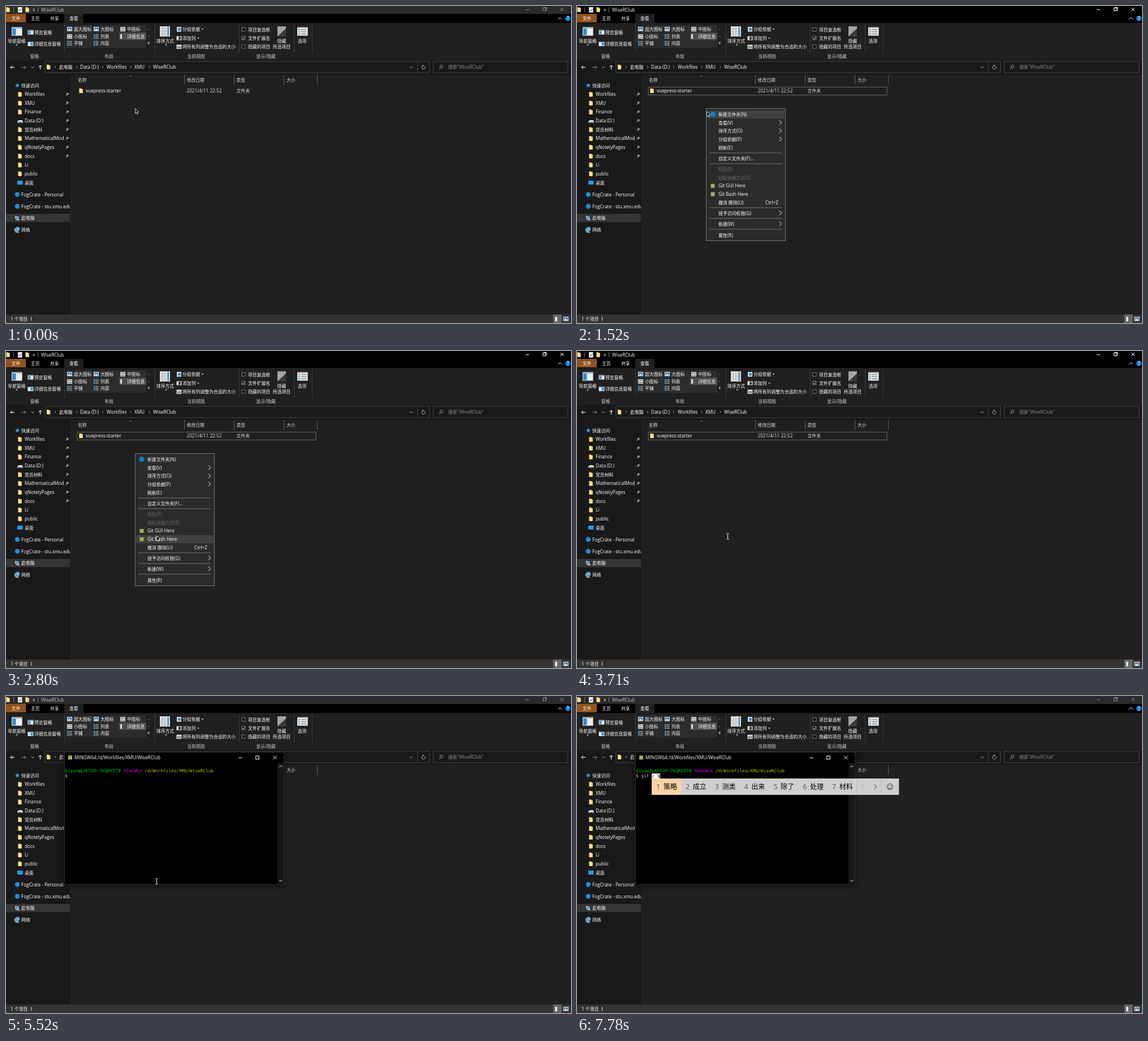
An HTML page with a canvas that plays this animation: 999 px wide and 561 px high, repeating every 8000 ms.

```html
<!DOCTYPE html>
<html lang="zh-CN">
<head>
<meta charset="utf-8">
<style>
html, body { margin: 0; width: 100%; height: 100%; overflow: hidden; background: #202020; }
canvas { display: block; width: 999px; height: 561px; }
</style>
</head>
<body>
<canvas id="stage" width="999" height="561"></canvas>
<script>
const g = document.getElementById('stage').getContext('2d');
const LOOP = 8000;
const UI = '"Open Sans", "Noto Sans CJK SC", "Noto Sans CJK", sans-serif';
const MONO = '"DejaVu Sans Mono", monospace';
const CELL = 4.7, COL0 = 104;
const BLUE = '#1e9be8', GIT = '#9ab45c';

function box(x, y, w, h, c) { g.fillStyle = c; g.fillRect(x, y, w, h); }
function frame(x, y, w, h, c, lw = 1) {
  g.strokeStyle = c; g.lineWidth = lw;
  g.strokeRect(x + .5, y + .5, w - 1, h - 1);
}
function line(c, lw, ...p) {
  g.strokeStyle = c; g.lineWidth = lw;
  g.beginPath();
  for (let i = 0; i < p.length; i += 2) g.lineTo(p[i], p[i + 1]);
  g.stroke();
}
function poly(c, ...p) {
  g.fillStyle = c;
  g.beginPath();
  for (let i = 0; i < p.length; i += 2) g.lineTo(p[i], p[i + 1]);
  g.closePath(); g.fill();
}
function disc(x, y, r, c) { g.fillStyle = c; g.beginPath(); g.arc(x, y, r, 0, 7); g.fill(); }
// y is the visual middle of the line; Chinese runs are set slightly smaller than Latin ones
function text(s, x, y, c = '#fff', align = 'left') {
  const runs = s.match(/[\u4e00-\u9fff]+|[^\u4e00-\u9fff]+/g);
  const setFont = r => g.font = (r >= '\u4e00' ? 7.85 : 8.2) + 'px ' + UI;
  const widths = runs.map(r => { setFont(r); return g.measureText(r).width; });
  if (align == 'center') x -= widths.reduce((a, b) => a + b) / 2;
  g.textAlign = 'left';
  g.fillStyle = c;
  runs.forEach((r, i) => {
    setFont(r);
    g.fillText(r, x, y + 3);
    x += widths[i];
  });
}
function chevron(x, y, dx, dy, c = '#fff', lw = 1) {
  if (dx) line(c, lw, x - dx / 2, y - Math.abs(dx), x + dx / 2, y, x - dx / 2, y + Math.abs(dx));
  else line(c, lw, x - Math.abs(dy), y - dy / 2, x, y + dy / 2, x + Math.abs(dy), y - dy / 2);
}
function drop(x, y, c = '#ddd') { poly(c, x - 1.8, y - 1, x + 1.8, y - 1, x, y + 1.2); }
function folder(x, y) {
  poly('#e3b341', x + .6, y - 4.2, x + 4.5, y - 4.2, x + 5.2, y - 3, x + 7, y - 3, x + 7, y + 4, x + .6, y + 4);
  poly('#fbe08a', x + .6, y - 4.2, x + 3.8, y - 3.3, x + 5.8, y - 2, x + 5.8, y + 4.3, x + .6, y + 4);
}
function pane(x, y, left) {
  box(x, y, 10, 8, '#e8e8e8');
  box(x, y, 10, 1.5, '#888');
  box(left ? x + 1 : x + 5, y + 2, 4, 5, BLUE);
}
function listIcon(x, y, c = '#ddd') {
  for (let i = 0; i < 3; i++) {
    box(x, y - 4 + i * 3, 2.5, 2, '#58a6e0');
    box(x + 3.5, y - 3.5 + i * 3, 5, 1, c);
  }
}
function gridIcon(x, y) {
  box(x, y - 4, 9, 8, '#ddd');
  for (let i = 0; i < 6; i++) box(x + 1 + i % 3 * 2.7, y - 2.7 + (i > 2) * 3.6, 1.6, 1.8, '#555');
}
function picIcon(x, y) {
  box(x, y - 4, 9, 7.5, '#eee');
  box(x + 1, y - 3, 7, 5.5, '#3d7eb0');
  poly('#dfeaf0', x + 1, y + 2.5, x + 4, y - 1, x + 8, y + 2.5);
}
function windowButtons(xs, y, c, r) {
  line(c, 1, xs[0] - r, y + .5, xs[0] + r, y + .5);
  frame(xs[1] - r, y - r, 2 * r, 2 * r, c);
  line(c, 1, xs[2] - r, y - r, xs[2] + r, y + r);
  line(c, 1, xs[2] - r, y + r, xs[2] + r, y - r);
}

function titleBar(active) {
  box(0, 0, 999, 14, active ? '#000' : '#2b2b2b');
  folder(0, 6.5);
  box(13, 2, 1, 9, '#777');
  box(21, 2, 7.5, 9.5, '#f2f2f2');
  line('#444', 1, 22.5, 7, 24, 9, 27, 5);
  folder(34, 6.5);
  box(47.5, 5, 3.5, .8, '#ccc');
  drop(49.2, 8);
  box(56, 2, 1, 9, '#777');
  text('WiseRClub', 62, 6.5, active ? '#fff' : '#c4c4c4');
  const c = active ? '#fff' : '#8c8c8c';
  windowButtons([922, 952, 983], 6, c, 3);
  line(c, .8, 950.5, 2.5, 955.8, 2.5, 955.8, 7.5);
}

function tabs() {
  box(0, 14, 999, 16, '#000');
  box(0, 14, 35, 15, '#93531b');
  box(103, 14, 34, 16, '#202020');
  text('文件', 17.5, 22, '#fff', 'center');
  text('主页', 44, 22);
  text('共享', 78, 22);
  text('查看', 112, 22);
  chevron(979.5, 22, 0, -3.5);
  disc(993.5, 22, 4.7, '#0a84d8');
  text('?', 993.5, 22, '#fff', 'center');
}

function ribbon() {
  box(0, 30, 999, 66, '#202020');
  for (const x of [103, 263, 412, 509, 541]) box(x, 32, 1, 51, '#3c3c3c');

  box(10, 37, 18.5, 15.5, '#eee');
  box(10, 37, 18.5, 2.5, '#9aa4aa');
  box(11, 40, 6.5, 11.5, '#2b8fd0');
  text('导航窗格', 19, 62, '#fff', 'center');
  drop(19, 69);
  pane(38.5, 42.5, true);
  text('预览窗格', 50, 47);
  pane(38.5, 63);
  text('详细信息窗格', 50, 67);

  box(106, 34, 142, 40, '#2c2c2c');
  box(200, 47, 48, 13, '#4e4e4e');
  picIcon(108, 41); text('超大图标', 120, 41);
  gridIcon(108, 54); text('小图标', 120, 54);
  listIcon(108, 66); text('平铺', 120, 66);
  picIcon(155, 41); text('大图标', 167, 41);
  listIcon(155, 54); text('列表', 167, 54);
  listIcon(155, 66); text('内容', 167, 66);
  gridIcon(202, 41); text('中图标', 214, 41);
  box(202, 50, 3, 8, '#ddd'); text('详细信息', 214, 54);
  poly('#666', 250.5, 42, 254, 42, 252.2, 40);
  drop(252.2, 54, '#666');
  box(250.4, 63.6, 3.6, .8, '#ddd');
  drop(252.2, 66.5);

  box(272, 36, 18, 18, '#eee');
  for (let i = 0; i < 5; i++) box(272, 39 + i * 3, 18, .7, '#8d99a0');
  for (let i = 0; i < 3; i++) box(276 + i * 4.5, 36, .7, 18, '#8d99a0');
  box(286, 37, 2, 16, '#3a96d2');
  text('排序方式', 281.5, 62, '#fff', 'center');
  drop(283, 69);
  box(302, 37, 8, 8.5, '#ddd'); box(304, 39, 5, 4.5, '#2b8fd0');
  text('分组依据', 312, 41); drop(347.5, 41);
  box(301.5, 53.5, 9, 7, '#ddd'); box(305, 54.5, 1, 6, '#444'); box(306, 54.5, 3, 5, '#333');
  text('添加列', 312, 57); drop(340, 57);
  box(301.5, 68.5, 9, 7.5, '#ddd');
  for (let i = 0; i < 3; i++) box(303 + i * 2.5, 71, 1.3, 4, '#456');
  text('将所有列调整为合适的大小', 312, 72);

  ['项目复选框', '文件扩展名', '隐藏的项目'].forEach((s, i) => {
    const y = 41.5 + i * 15.2;
    box(417, y - 3.5, 7, 7, '#000');
    frame(416.5, y - 3.5, 7, 7, '#aaa', .8);
    if (i == 1) line('#fff', 1, 418, y, 419.6, y + 2, 422.5, y - 2);
    text(s, 428, y);
  });
  poly('#a5a5a5', 480, 36, 495, 36, 495, 40, 480, 54);
  poly('#3a3a3a', 495, 40, 495, 54, 480, 54);
  text('隐藏', 487.5, 62, '#fff', 'center');
  text('所选项目', 487.5, 72, '#fff', 'center');
  box(515, 37, 18.5, 15.5, '#eee');
  box(515, 37, 18.5, 2, '#999');
  for (let i = 0; i < 3; i++) {
    box(517, 41 + i * 3.7, 2.5, 2, '#2b8fd0');
    box(521.5, 41.5 + i * 3.7, 10, 1, '#555');
  }
  text('选项', 523.5, 62, '#fff', 'center');
  [['窗格', 50.5], ['布局', 182], ['当前视图', 336], ['显示/隐藏', 459.5]]
    .forEach(([s, x]) => text(s, x, 88.5, '#d0d0d0', 'center'));
}

function addressRow() {
  box(0, 96, 999, 26, '#191919');
  line('#fff', 1.1, 15, 108.5, 8, 108.5); chevron(9.5, 108.5, -3, 0);
  line('#888', 1, 27.5, 108.5, 35, 108.5); chevron(33.5, 108.5, 3, 0, '#888');
  chevron(47, 108.5, 0, 2.2, '#ccc');
  line('#fff', 1.1, 60.5, 112.5, 60.5, 105); chevron(60.5, 106.5, 0, -3);
  frame(68.5, 97.5, 681, 21, '#484848');
  folder(71.5, 108);
  [['此电脑', 94], ['Data (D:)', 131], ['Workfiles', 178], ['XMU', 227], ['WiseRClub', 260]]
    .forEach(([s, x]) => text(s, x, 108));
  for (const x of [87, 125, 171, 220.5, 253.5]) chevron(x, 108, 2, 0, '#bbb', .8);
  chevron(716.5, 108.5, 0, 2.6, '#bbb');
  box(727, 99, 1, 19, '#3d3d3d');
  g.strokeStyle = '#aaa'; g.lineWidth = 1;
  g.beginPath(); g.arc(738, 108.5, 3.2, -.6, 4.4); g.stroke();
  poly('#aaa', 736.5, 103.8, 739.5, 105.4, 737, 107);
  frame(755, 97.5, 239, 21, '#484848');
  g.strokeStyle = '#999';
  g.beginPath(); g.arc(770, 107, 2.5, 0, 7); g.stroke();
  line('#999', 1, 768.3, 109, 765.5, 112);
  text('搜索"WiseRClub"', 782, 108, '#8c8c8c');
}

function pin(y) {
  poly('#9a9a9a', 108.5, y - 3.5, 111.8, y - .5, 110, y, 108.8, y + 2.2, 106, y - .8, 108, y - 1.8);
  line('#9a9a9a', .9, 107.4, y + .6, 105.3, y + 3);
}
function pcIcon(x, y) {
  poly('#cfd8de', x, y - 3.5, x + 6.5, y - 2.5, x + 6.5, y + 2, x, y + 1.5);
  poly('#3c9ad6', x + .8, y - 2.7, x + 5.8, y - 1.8, x + 5.8, y + 1.2, x + .8, y + .7);
  poly('#c5cdd2', x + 2, y + 2.2, x + 8.5, y + 2.8, x + 7, y + 4.4, x + 1, y + 3.4);
}
function clipped(s, y, x, right) {
  g.save();
  g.beginPath(); g.rect(0, y - 7, right, 14); g.clip();
  text(s, x, y);
  g.restore();
}

function sidebar() {
  box(0, 122, 114, 424, '#191919');
  box(114, 122, 1, 424, '#252525');
  const star = [];
  for (let i = 0; i < 10; i++) {
    const a = i * Math.PI / 5 - Math.PI / 2, r = i % 2 ? 1.9 : 4.6;
    star.push(20 + r * Math.cos(a), 140.5 + r * Math.sin(a));
  }
  poly('#2ea3f2', ...star);
  text('快速访问', 27, 140.5);
  ['Workfiles', 'XMU', 'Finance', 'Data (D:)', '党员材料', 'MathematicalModel',
   'qNotelyPages', 'docs', 'Li', 'public', '桌面'].forEach((s, i) => {
    const y = 156.2 + i * 15.63;
    if (i == 3) {
      poly('#eee', 20, y + 1, 23, y - 1, 28, y - 1, 30, y + 1, 30, y + 3.5, 20, y + 3.5);
      box(20.5, y + 1.5, 9, 1.2, '#777');
    } else if (i == 10) {
      box(20, y - 3.5, 9.5, 7, '#1d9bf0');
    } else folder(21, y);
    clipped(s, y, 33, 103);
    if (i < 8) pin(y);
  });
  disc(20, 333.5, 4.2, '#1b8fe0');
  text('FogCrate - Personal', 27, 333.5);
  disc(20, 354.5, 4.2, '#1b8fe0');
  clipped('FogCrate - stu.xmu.edu.cn', 354.5, 27, 114);
  box(0, 368, 113, 14.5, '#363636');
  pcIcon(16, 375);
  text('此电脑', 27, 375.3);
  disc(20.5, 394.5, 3.8, '#4ba6de');
  pcIcon(15, 397);
  text('网络', 27, 396);
}

function content(outlined) {
  box(115, 122, 884, 424, '#202020');
  for (const x of [315, 403, 491, 550]) box(x, 122, 1, 17, '#606060');
  chevron(220, 124, 0, -2, '#999', .8);
  [['名称', 127], ['修改日期', 319.5], ['类型', 407.5], ['大小', 496]]
    .forEach(([s, x]) => text(s, x, 130.5, '#dedede'));
  if (outlined) frame(125.5, 143, 423, 15, '#686868');
  folder(129, 150);
  text('vuepress-starter', 141, 150.3);
  text('2021/4/11 22:52', 319.5, 150.3, '#dedede');
  text('文件夹', 407.5, 150.3, '#dedede');
}

function statusBar() {
  box(0, 546, 999, 15, '#333');
  text('1 个项目', 8, 553.7);
  box(44, 550, 1, 7, '#ddd');
  box(967.5, 546, 15, 15, '#666');
  box(971, 550, 3.5, 8, '#eee');
  picIcon(985.5, 554);
}

// label, middle y, kind: s = submenu, d = disabled
const ITEMS = [
  ['新建文件夹(N)', 192], ['查看(V)', 206.8, 's'], ['排序方式(O)', 221.4, 's'],
  ['分组依据(P)', 236, 's'], ['刷新(E)', 250.7], ['自定义文件夹(F)...', 270],
  ['粘贴(P)', 289, 'd'], ['粘贴快捷方式(S)', 303.7, 'd'], ['Git GUI Here', 318.3],
  ['Git Bash Here', 333], ['撤消 删除(U)', 347.7], ['授予访问权限(G)', 366.8, 's'],
  ['新建(W)', 386, 's'], ['属性(R)', 405.5]
];
function menu(alpha, p) {
  g.save();
  g.globalAlpha = alpha;
  box(228, 181, 141, 235, '#2b2b2b');
  frame(228, 181, 141, 235, '#747474');
  for (const y of [260, 279, 357, 376, 395]) box(234, y - .5, 128, 1, '#777');
  for (const [s, y, kind] of ITEMS) {
    const hot = alpha == 1 && p.y > 184 && Math.abs(p.y - y) < 7.35 && kind != 'd';
    if (hot) box(230, y - 7.3, 137, 14.6, '#414141');
    text(s, 250, y, kind == 'd' ? '#6a6a6a' : '#fff');
    if (kind == 's') chevron(359.7, y - .5, 4, 0);
  }
  text('Ctrl+Z', 333, 347.7);
  disc(240, 191.8, 4.7, '#0a7fd6');
  box(236.5, 314.8, 7, 7, GIT);
  box(236.5, 329.5, 7, 7, GIT);
  g.restore();
}

function arrow(x, y) {
  const p = [0, 0, 0, 8.6, 2, 6.8, 3.3, 9.8, 4.8, 9.1, 3.5, 6.2, 6, 6.2];
  const q = p.map((v, i) => v + (i % 2 ? y : x) + .5);
  poly('#000', ...q);
  line('#fff', .8, ...q, q[0], q[1]);
}
function iBeam(x, y) {
  line('#fff', 1, x - .5, y - 4.5, x - .5, y + 4.5);
  for (const d of [-5, 5]) {
    line('#fff', 1, x - 3, y + d, x - 1.2, y + d);
    line('#fff', 1, x + .2, y + d, x + 2, y + d);
  }
}
function ring(x, y) {
  g.lineWidth = 3;
  g.strokeStyle = '#1c86d1';
  g.beginPath(); g.arc(x, y, 6, 0, 7); g.stroke();
  g.strokeStyle = '#8fd3fa';
  g.beginPath(); g.arc(x, y, 6, -2.2, -.4); g.stroke();
}

function mono(s, col, y, c) {
  g.font = (CELL / .602).toFixed(2) + 'px ' + MONO;
  g.textAlign = 'left';
  g.fillStyle = c;
  g.fillText(s, COL0 + col * CELL, y + 2.8);
}
function caret(col, y) { box(Math.round(COL0 + col * CELL), y, 1, 9, '#bfbfbf'); }

function compose(s, col) {
  box(COL0 + col * CELL - .2, 137, s.length * CELL + 1, 9, '#fff');
  mono(s, col, 141.3, '#000');
  box(COL0 + (col + s.length) * CELL - 1, 138, 1, 7, '#000');
}
function candidates(words, x, alpha = 1) {
  g.save();
  g.globalAlpha = alpha;
  g.textAlign = 'left';
  const setFont = s => g.font = (/^[a-z]+$/.test(s) ? 13 : 12) + 'px ' + UI;
  const widths = words.map(s => { setFont(s); return g.measureText(s).width + 27.8; });
  const end = x + widths.reduce((a, b) => a + b);
  box(x, 146, end - x + 74.5, 29, '#cfcfcf');
  box(x, 146, widths[0], 29, '#ffd1a8');
  words.forEach((s, i) => {
    g.font = '12.5px ' + UI;
    g.fillStyle = '#555';
    g.fillText(i + 1, x + 8, 165);
    setFont(s);
    g.fillStyle = '#000';
    g.fillText(s, x + 20.7, 165);
    x += widths[i];
  });
  box(end, 146, 1, 29, '#b8b8b8');
  box(end + 42.5, 146, 1, 29, '#b8b8b8');
  chevron(end + 10, 160.5, -4, 0, '#999');
  chevron(end + 33, 160.5, 4, 0, '#222');
  g.strokeStyle = '#222'; g.lineWidth = 1;
  g.beginPath(); g.arc(end + 58.5, 160.5, 5, 0, 7); g.stroke();
  g.beginPath(); g.arc(end + 58.5, 161, 2.7, .3, 2.84); g.stroke();
  disc(end + 56.7, 159, .8, '#222');
  disc(end + 60.3, 159, .8, '#222');
  g.restore();
}

function terminal(t) {
  const k = Math.min(1, (t - 3800) / 160), e = 1 - (1 - k) ** 3;
  const ready = t >= 5050;
  g.save();
  g.globalAlpha = .25 + .75 * e;
  const s = .93 + .07 * e;
  g.translate(297.5, 216.5); g.scale(s, s); g.translate(-297.5, -216.5);
  g.save();
  g.shadowColor = 'rgba(0,0,0,.6)'; g.shadowBlur = 10; g.shadowOffsetY = 3;
  box(104, 100, 387, 233, '#000');
  g.restore();
  frame(103, 99, 389, 235, '#2c2c2c');
  box(110, 105.5, 7, 7, GIT);
  text(ready ? 'MINGW64:/d/Workfiles/XMU/WiseRClub' : '/usr/bin/bash --login -i', 121, 109);
  windowButtons([414.5, 444.5, 475.5], 109, '#fff', 3.3);
  box(480, 119, 11, 214, '#171717');
  chevron(485.7, 124.5, 0, -2.6);
  chevron(485.7, 327, 0, 2.6);
  if (ready) {
    mono('Qiyue@LAPTOP-7KQRX5TN', 0, 132, '#00bf00');
    mono('MINGW64', 22, 132, '#bf00bf');
    mono('/d/Workfiles/XMU/WiseRClub', 30, 132, '#bfbf00');
    mono('$', 0, 141.3, '#bfbfbf');
  }
  g.restore();

  if ((t >= 3960 && t < 4260) || (t >= 4740 && t < 5050)) caret(0, 119);
  if (t >= 5050 && t < 5520) caret(2, 137);
  if (t >= 6700) mono('git', 2, 141.3, '#bfbfbf');
  if (t >= 6700 && t < 7470) caret(t < 6930 ? 5 : 6, 137);
}

const G = ['个', '给', '跟', '过', '该', '高', '国'];
const GI = ['给i', '给', '个', '跟', '过', '该', '高'];
const GIT_WORDS = ['给i他', 'git', '给', '个', '跟', '过', '该'];
const C = ['从', '才', '吃', '成', '出', '次', '长'];
const CL = ['策略', '成立', '测类', '出来', '除了', '处理', '材料'];
function typing(t) {
  const x1 = 113.7, x2 = 132.2;
  if (t >= 6050 && t < 6700) compose(t < 6140 ? 'g' : t < 6290 ? 'g i' : 'g i t', 2);
  if (t >= 7470) compose(t < 7700 ? 'c' : 'c l', 6);
  if (t >= 6050 && t < 6140) candidates(G, x1, .5);
  else if (t >= 6140 && t < 6360) candidates(GI, x1);
  else if (t >= 6360 && t < 6750) candidates(GIT_WORDS, x1, t < 6700 ? 1 : .4);
  else if (t >= 7470 && t < 7700) candidates(C, x2, t < 7550 ? .5 : 1);
  else if (t >= 7700) candidates(CL, x2);
}

// stepped move: n positions, the first at t0 and the last at t1
function steps(t, t0, t1, n) {
  if (t < t0) return 0;
  const k = Math.min(n, Math.floor((t - t0) / (t1 - t0) * (n - 1) + 1e-6) + 1) / n;
  return k * k * (3 - 2 * k);
}
function pointer(t) {
  const a = steps(t, 1520, 2080, 8), b = steps(t, 2460, 2800, 5);
  return { x: 228 + 29 * a + 9 * b, y: 181 + 125 * a + 20.7 * b };
}
function menuAlpha(t) {
  if (t < 1050 || t >= 3560) return 0;
  if (t < 1110) return .36;
  if (t < 1200) return .75;
  return t < 3350 ? 1 : 1 - (t - 3350) / 210;
}

function draw(t) {
  const active = t >= 70 && t < 3860;
  titleBar(active);
  tabs();
  ribbon();
  addressRow();
  sidebar();
  content(active);
  statusBar();
  const p = pointer(t), m = menuAlpha(t);
  if (m) menu(m, p);
  if (t >= 3800) terminal(t);
  typing(t);
  if (t < 3110) arrow(p.x, p.y);
  else if (t < 3640) ring(266, 328);
  else if (t < 6930) iBeam(267, 328);
}

const start = performance.now();
function tick() {
  draw((performance.now() - start) % LOOP);
  requestAnimationFrame(tick);
}
tick();
</script>
</body>
</html>
```
